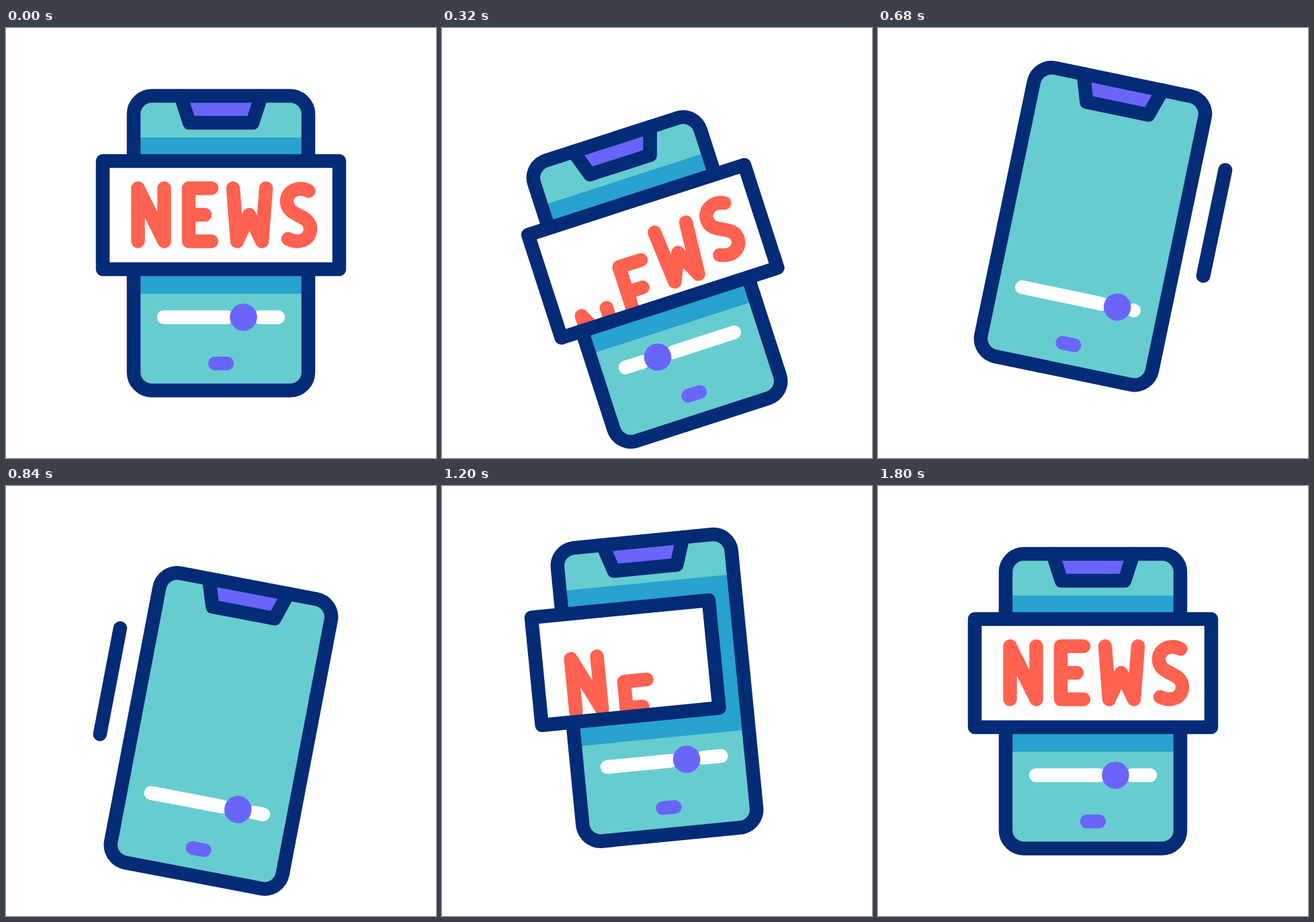
Animation of 640x640 px, one loop 2.04 s. Source, as an HTML page:

```html
<!DOCTYPE html>
<html lang="en">
<head>
<meta charset="utf-8">
<title>News on a phone</title>
<style>
  html, body { margin: 0; width: 100%; height: 100%; overflow: hidden; background: #fff; }
  svg { display: block; width: 100%; height: 100%; }
  .line { fill: none; stroke-width: 20.5; stroke-linecap: round; stroke-linejoin: round; }
  .navy { stroke: #032b76; }
  .white { stroke: #fff; }
  .violet { stroke: #6a65f9; }
  .red { stroke: #ff6250; }
</style>
</head>
<body>
<svg viewBox="0 0 640 640" role="img" aria-label="NEWS">
  <defs>
    <clipPath id="screen"><rect x="190" y="101" width="260" height="438.5" rx="27"/></clipPath>
    <clipPath id="window"><rect id="opening" y="198" height="161"/></clipPath>
  </defs>
  <g id="device">
    <rect x="190" y="101" width="260" height="438.5" rx="27" fill="#67ccd0"/>
    <g clip-path="url(#screen)"><rect id="band" y="163" height="232.5" fill="#28a2ce"/></g>
    <path class="line navy" style="fill:#6a65f9" d="M260 101L273 141H367L380 101"/>
    <rect class="line navy" x="190" y="101" width="260" height="438.5" rx="27"/>
    <path id="track" class="line white"/>
    <circle id="knob" cy="430.5" r="20.3" fill="#6a65f9"/>
    <path class="line violet" d="M311 499.3H329"/>
    <rect id="paper" y="198" height="161" fill="#fff"/>
    <g clip-path="url(#window)">
      <path class="line red letter" d="M196.5 317.5V238.5L235.5 317.5V238.5"/>
      <path class="line red letter" d="M306 238.5H272V317.5H306M272 278H296"/>
      <path class="line red letter" d="M338 238.5L344 317.5L362 278L381 317.5L387 238.5"/>
      <path class="line red letter" d="M450.5 242.5C436 235 418 242 418 258C418 282 453 276 453 299C453 315 437 322 420 314"/>
    </g>
    <path id="frame" class="line navy"/>
  </g>
</svg>
<script>
const LOOP = 2040;
const LEFT = 144, RIGHT = 496;
const $ = id => document.getElementById(id);
const letters = [...document.querySelectorAll('.letter')];

// Each key is [time, value]; every stretch eases in and out.
const tilt = [[0, 0], [350, -18.3], [725, 13], [770, 13], [1120, -8.2], [1390, 4.2], [1800, 0]];
const bounce = [[0, 0], [325, 54], [610, -38.5], [905, 56], [1205, -20], [1500, 15.5], [1800, 0]];
const slide = [[0, 353.5], [325, 285.3], [675, 380], [1005, 353.5]];

const ease = u => {
  u = Math.min(1, Math.max(0, u));
  return u * u * (3 - 2 * u);
};

function at(keys, t) {
  const i = keys.findIndex(key => key[0] > t);
  if (i < 0) return keys[keys.length - 1][1];
  const [t0, a] = keys[i - 1], [t1, b] = keys[i];
  return a + (b - a) * ease((t - t0) / (t1 - t0));
}

function span(el, x0, x1) {
  el.setAttribute('x', x0);
  el.setAttribute('width', Math.max(0, x1 - x0));
}

// Letters fall one after another, then rise in the same order.
function drop(t, i) {
  const stagger = 60 * i;
  const time = t < 800 ? t - 127 - stagger : 1300 + stagger - t;
  return Math.min(160, (0.0515 * Math.max(0, time)) ** 2);
}

function draw(t) {
  $('device').setAttribute('transform',
    `translate(0 ${at(bounce, t)}) rotate(${at(tilt, t)} 320 320)`);

  const closing = t < 800;
  const shut = ease((t - 270) / 420), open = ease((t - 916) / 420);
  const x0 = closing ? LEFT + (RIGHT - LEFT) * shut : LEFT;
  const x1 = closing ? RIGHT : LEFT + (RIGHT - LEFT) * open;
  span($('paper'), x0, x1);
  span($('opening'), x0, x1);
  $('frame').setAttribute('d', `M${x0} 198H${x1}V359H${x0}Z`);
  if (closing) span($('band'), 140 + 360 * shut, 500);
  else span($('band'), 140, 140 + 405 * open);

  const k = at(slide, t);
  $('knob').setAttribute('cx', k);
  $('track').setAttribute('d', `M235 430.5H${k - 24}M${Math.min(404.9, k + 24)} 430.5H405`);

  letters.forEach((el, i) => el.setAttribute('transform', `translate(0 ${drop(t, i)})`));
}

const start = performance.now();
function tick() {
  const t = (performance.now() - start) % LOOP;
  draw(Math.floor(t / 20) * 20);
  requestAnimationFrame(tick);
}
tick();
</script>
</body>
</html>
```
